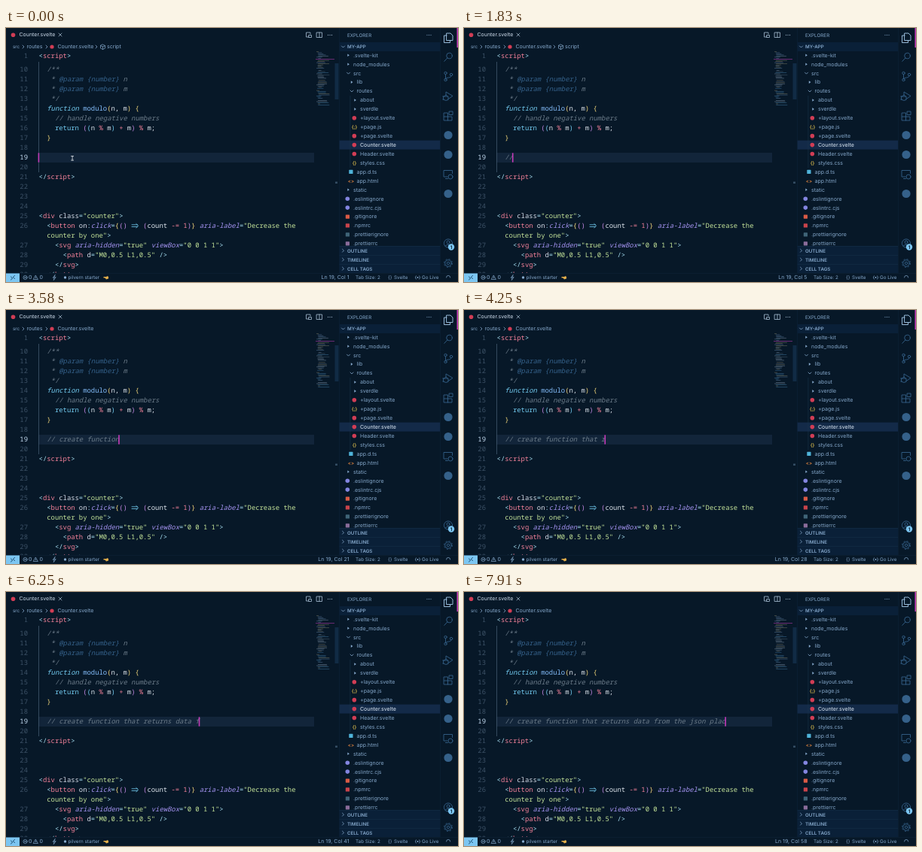
Recreate the animation shown at these times as an HTML page. Size 600 by 338 pixels, loop 8000 ms.

```html
<!DOCTYPE html>
<html lang="en">
<head>
<meta charset="utf-8">
<title>Code editor</title>
<style>
  html, body { margin: 0; width: 100%; height: 100%; overflow: hidden; background: #071828; }
  svg { display: block; width: 100%; height: 100%; }
  text { white-space: pre; text-rendering: geometricPrecision; }
  .code { font: 500 8.88px "Noto Sans Mono", "DejaVu Sans Mono", monospace; fill: #dfe6ee; font-variant-ligatures: none; }
  .ui { font: 7px Inter, Roboto, sans-serif; fill: #86a9cc; }
  .small { font-size: 6.3px; }
  .bold { font-weight: 600; font-size: 6.2px; }
  .line { fill: none; stroke: #35618a; stroke-width: .9; stroke-linecap: round; stroke-linejoin: round; }
  .num { fill: #3d5267; font-weight: 400; }
  .current { fill: #c5dcf2; }
  .comment { fill: #6c7c8a; font-style: italic; font-weight: 400; }
  .ghost { fill: #5a6978; font-style: italic; font-weight: 400; }
  .punct { fill: #a5dcef; }
  .tag { fill: #f5829a; }
  .attr { fill: #a594f2; font-style: italic; }
  .plain { fill: #d9deea; }
  .string { fill: #c5e49a; }
  .key { fill: #74cdf2; }
  .storage { fill: #74cdf2; font-style: italic; }
  .fn { fill: #84bdfa; }
  .op { fill: #f5829a; }
  .brace { fill: #f2d67a; }
  .round { fill: #c78ae6; }
  .doc { fill: #35618a; font-style: italic; }
</style>
</head>
<body>
<svg id="stage" viewBox="0 0 600 338"></svg>
<script>
const CELL = 5.328, LEFT = 43.6, LOOP = 8000;
const BACK = '#071828', RED = '#d13d55', PINK = '#c43bb8', DIM = '#35618a', TEXT = '#86a9cc', SKY = '#7cc6f2';
const out = [];
const add = markup => out.push(markup);
const esc = s => s.replace(/&/g, '&amp;').replace(/</g, '&lt;');
const rect = (x, y, w, h, fill, extra = '') =>
  add(`<rect x="${x}" y="${y}" width="${w}" height="${h}" fill="${fill}" ${extra}/>`);
const dot = (x, y, r, fill) => add(`<circle cx="${x}" cy="${y}" r="${r}" fill="${fill}"/>`);
const ring = (x, y, r, extra = '') => add(`<circle class="line" cx="${x}" cy="${y}" r="${r}" ${extra}/>`);
const line = (d, extra = '') => add(`<path class="line" d="${d}" ${extra}/>`);
const pen = (color, width) => `style="stroke:${color};stroke-width:${width}"`;
const ui = (x, y, s, cls = '', extra = '') =>
  add(`<text class="ui ${cls}" x="${x}" y="${y + 2.4}" ${extra}>${esc(s)}</text>`);
const chevron = (x, y, open) => line(open
  ? `M${x - 2} ${y - 1}l2 2 2-2` : `M${x - 1} ${y - 2}l2 2-2 2`, pen(TEXT, .8));
const triangle = (x, y) => add(`<path d="M${x - 1.2} ${y - 1.8}l2.6 1.8-2.6 1.8z" fill="${TEXT}"/>`);

// Each segment is "class|text"; an empty class keeps the default colour.
function code(number, y, indent, ...segments) {
  if (number) add(`<text class="code num ${number === 19 ? 'current' : ''}" x="29" y="${y + 3.1}" text-anchor="end">${number}</text>`);
  const spans = segments.map(s => {
    const cut = s.indexOf('|');
    return `<tspan class="${s.slice(0, cut)}">${esc(s.slice(cut + 1))}</tspan>`;
  });
  if (spans.length)
    add(`<text class="code" x="${LEFT + indent * CELL}" y="${y + 3.1}">${spans.join('')}</text>`);
}

function drawEditor() {
  dot(9.5, 9.3, 2.8, RED);
  ui(17.5, 9, 'Counter.svelte', '', 'style="fill:#cfdcec"');
  line('M70 7l4 4m0-4l-4 4', pen('#9fb6c8', .8));
  const bright = pen('#a9bfd4', .8);
  line('M402 12h-3.5V6H404v2M402 9.5h3.5v3H402z', bright);
  line('M412.5 6h7v6.5h-7zM416 6v6.5', bright);
  [427.5, 430, 432.5].forEach(x => dot(x, 9.3, .65, '#a9bfd4'));

  ui(9, 25, 'src', 'small');
  chevron(23, 25);
  ui(27.5, 25, 'routes');
  chevron(54, 25);
  dot(61, 25, 2.6, RED);
  ui(68.5, 25, 'Counter.svelte');
  add('<g id="crumb">');
  chevron(120, 25);
  line('M128.5 22l3 1.5v3.5l-3 1.5-3-1.5v-3.5zM125.5 23.5l3 1.5 3-1.5M128.5 25v3.5', pen(TEXT, .7));
  ui(134, 25, 'script');
  add('</g>');

  rect(43, 166, 366, 13, '#12253a');
  rect(43.2, 45, .7, 147, '#4a6076');
  code(1, 36.5, 0, 'punct|<', 'tag|script', 'punct|>');
  code(10, 55, 2, 'comment|/**');
  code(11, 68, 2, 'comment| * ', 'doc|@param {number}', 'comment| n');
  code(12, 81, 2, 'comment| * ', 'doc|@param {number}', 'comment| m');
  code(13, 94, 2, 'comment| */');
  code(14, 107, 2, 'storage|function ', 'fn|modulo', 'brace|(', '|n, m', 'brace|) {');
  code(15, 120, 4, 'comment|// handle negative numbers');
  code(16, 133, 4, 'key|return ', 'round|(', 'key|(', '|n ', 'op|% ', '|m', 'key|) ', 'op|+ ', '|m', 'round|) ', 'op|% ', '|m;');
  code(17, 146, 2, 'brace|}');
  [18, 19, 20].forEach(n => code(n, 172 + (n - 19) * 13, 0));
  code(21, 198, 0, 'punct|</', 'tag|script', 'punct|>');
  [22, 23, 24].forEach(n => code(n, 198 + (n - 21) * 13, 0));
  code(25, 250, 0, 'punct|<', 'tag|div ', 'plain|class', 'punct|=', 'string|"counter"', 'punct|>');
  code(26, 263, 2, 'punct|<', 'tag|button ', 'plain|on', 'punct|:', 'attr|click', 'punct|=', 'brace|{',
    'round|()', '|    ', 'round|(', '|count ', 'op|-= ', 'op|1', 'round|)', 'brace|} ',
    'attr|aria-label', 'punct|=', 'string|"Decrease the');
  line('M167 261.8h7.5m-7.5 2.7h7.5m-1.7-4l2.8 2.7-2.8 2.7', pen('#74cdf2', .8));
  code(0, 276, 2, 'string|counter by one"', 'punct|>');
  code(27, 289, 4, 'punct|<', 'tag|svg ', 'attr|aria-hidden', 'punct|=', 'string|"true" ',
    'attr|viewBox', 'punct|=', 'string|"0 0 1 1"', 'punct|>');
  code(28, 302, 6, 'punct|<', 'tag|path ', 'plain|d', 'punct|=', 'string|"M0,0.5 L1,0.5" ', 'punct|/>');
  code(29, 315, 4, 'punct|</', 'tag|svg', 'punct|>');
  code(30, 328, 2, 'punct|</', 'tag|button', 'punct|>');

  add(`<text id="typed" class="code" x="${LEFT + 2 * CELL}" y="175.1"></text>`);
  rect(0, 166.3, 1.6, 12.4, PINK, 'id="caret"');
  line('M86.6 170.5h3M88.1 170.5v5.5M86.6 176h3', 'id="pointer" ' + pen('#e4e8ec', .8));
}

function drawMinimap() {
  let seed = 7;
  const random = () => (seed = seed * 16807 % 2147483647) / 2147483647;
  const tones = ['#4f8fc0', '#8fa3b8', '#5d7082', '#6f8fb8', '#9a8f70'];
  for (let i = 0; i < 49; i++) {
    if (i % 9 === 7) continue;
    const x = 412 + (i % 5 ? 1 + random() * 2 : 0);
    rect(x, 31 + i * 1.48, 3 + random() * 13, .75, tones[Math.floor(random() * 5)], 'opacity=".5"');
  }
  rect(411, 41, 25, .8, PINK, 'opacity=".65"');
  rect(436.5, 47, 5, 48, '#1d4468', 'opacity=".45"');
  rect(437, 204.5, 3, 2.5, '#52718b', 'opacity=".6"');
}

function drawExplorer() {
  rect(442, 0, .6, 326, '#0e2438');
  ui(453, 9.5, 'EXPLORER', 'small');
  [559, 561.5, 564].forEach(x => dot(x, 9.3, .6, TEXT));
  rect(442.6, 19, 133.4, 12, '#0a2038');
  chevron(447.5, 25, true);
  ui(453, 25, 'MY-APP', 'bold');

  const purple = '#8385e0', orange = '#e0853f', gold = '#e0c04d';
  // kind: ">" closed folder, "v" open folder, "{…" or "<…" text icon, otherwise an icon colour
  const rows = [
    ['.svelte-kit', 0, '>'], ['node_modules', 0, '>'], ['src', 0, 'v'], ['lib', 1, '>'], ['routes', 1, 'v'],
    ['about', 2, '>'], ['sverdle', 2, '>'], ['+layout.svelte', 2, RED], ['+page.js', 2, '{;}'],
    ['+page.svelte', 2, RED], ['Counter.svelte', 2, RED], ['Header.svelte', 2, RED], ['styles.css', 2, '{}'],
    ['app.d.ts', 1, '#4fb3d9'], ['app.html', 1, '<>'], ['static', 0, '>'], ['.eslintignore', 0, purple],
    ['.eslintrc.cjs', 0, purple], ['.gitignore', 0, '#d95a45'], ['.npmrc', 0, '#c8434b'],
    ['.prettierignore', 0, '#3f6478'], ['.prettierrc', 0, '#8a6c9a']
  ];
  rows.forEach(([name, depth, kind], i) => {
    const y = 36.3 + i * 11.93, x = 461 + depth * 4.5, active = name === 'Counter.svelte';
    if (active) rect(442.6, y - 6, 133.4, 12, '#132a48');
    if (kind === 'v') chevron(x - 6.5, y, true);
    else if (kind === '>') triangle(x - 6.5, y);
    else if (kind[0] === '{' || kind[0] === '<')
      ui(x - 7.5, y, kind, 'bold', `text-anchor="middle" style="fill:${kind[0] === '<' ? orange : gold}"`);
    else if (kind === RED || kind === purple) dot(x - 7.7, y, 2.8, kind);
    else rect(x - 10.2, y - 2.6, 5.2, 5.2, kind, 'rx=".6"');
    ui(x, y, name, '', active ? 'style="fill:#e3eefa"' : '');
  });
  rect(456.7, 90, .5, 96, '#1c3a50');

  ['OUTLINE', 'TIMELINE', 'CELL TAGS'].forEach((name, i) => {
    const y = 296.2 + i * 12;
    rect(442.6, y - 6, 133.4, 12, '#0a2038');
    rect(442.6, y - 6, 133.4, .6, '#15304a');
    chevron(447.5, y);
    ui(453, y, name, 'bold');
  });
}

function drawActivityBar() {
  rect(576, 0, 24, 326, BACK);
  rect(576, 0, .6, 326, '#0e2438');
  rect(598.5, 0, 1.5, 26, PINK);
  line('M585 7h5l3 3v6.5h-8zM585 10h-3.5v9.5h8V17', pen('#a9cdec', .9));
  ring(588.5, 37, 3.8);
  line('M585.8 40l-4 4.3');
  [[583.5, 60], [583.5, 69], [591, 62]].forEach(([x, y]) => ring(x, y, 1.7));
  line('M583.5 62v5M591 64c0 3-7 1-7.5 4');
  line('M584 89v-4l9 5.5-6 4');
  line('M581 91h6v4.5q-3 2-6 0zM579.8 91h1.2M579.8 95h1.2M582 91q2-4 4 0');
  line('M581.5 113h5v5h5.5v5h-10.5zM581.5 118h5v5M588.5 111h4.5v4.5h-4.5z');
  [142.5, 168.5, 220.5].forEach(y => dot(587, y, 5.6, DIM));
  line('M586 198h-5v-8.5h11.5v4M583.5 200.5h3');
  ring(590, 198, 3);
  ring(587, 286.5, 5.6);
  ring(587, 285, 2);
  line('M583 290.2q4-4 8 0');
  dot(591, 291.5, 4.2, SKY);
  ui(591, 291.3, '1', 'bold', `text-anchor="middle" style="fill:${BACK}"`);
  ring(587, 313, 1.7);
  ring(587, 313, 4.2);
  ring(587, 313, 5.4, 'stroke-dasharray="2.12" style="stroke-linecap:butt"');
}

function drawStatusBar() {
  rect(0, 326, 600, 12, BACK);
  rect(0, 326, 600, .5, '#0e2438');
  rect(0, 326.5, 18, 11.5, SKY);
  line('M6.5 331l2.2 2-2.2 2M11.5 329.5l-2.2 2 2.2 2', pen('#0c3a5c', .9));
  const thin = pen(TEXT, .7);
  ring(25.5, 332, 2.6, thin);
  line('M24.5 331l2 2m0-2l-2 2', thin);
  ui(30, 332, '0');
  line('M39.5 329.3l2.9 5.2h-5.8zM39.5 331.3v1.5', thin);
  ui(44.5, 332, '0');
  line('M65 328.7l-2.8 3.7h2l-1 3.2 3-4h-2z', thin);
  dot(78.5, 332, 1.7, TEXT);
  ui(82.5, 332, 'pilvern starter', 'small');
  add('<path d="M129.5 331h3.5l2-1q1.6 1 1 3.6l-3 1-1.6-2h-1.9z" fill="#e0ac4a"/>');
  add('<text id="position" class="ui" x="455.5" y="334.4" text-anchor="end"></text>');
  ui(464, 332, 'Tab Size: 2', 'small');
  ui(507, 332, '{}', 'small');
  ui(515, 332, 'Svelte', 'small');
  dot(546.5, 332, 1, TEXT);
  line('M544.3 334.2a3.1 3.1 0 0 1 0-4.4M548.7 329.8a3.1 3.1 0 0 1 0 4.4', thin);
  ui(552, 332, 'Go Live', 'small');
  line('M584.5 332q0-2.6 2.6-2.6t2.6 2.6', thin);
}

rect(0, 0, 600, 338, BACK);
drawEditor();
drawMinimap();
drawExplorer();
drawActivityBar();
drawStatusBar();
document.getElementById('stage').innerHTML = out.join('');

const [typed, caret, pointer, crumb, position] =
  ['typed', 'caret', 'pointer', 'crumb', 'position'].map(id => document.getElementById(id));

const INDENT_AT = 500, GHOST_AT = 830, TYPE_AT = 1660, CRUMB_END = 2900, REWRITE_AT = 5450;
const GHOST = '$: $displayed_count = Math.round($displayed_count);';
const FIRST = '// create function that requires ';
const SECOND = '// create function that returns data from the json plac';
// [time, characters on the line]
const pace = [[TYPE_AT, 0], [2410, 8], [3580, 18], [4920, 33], [5060, 33], [REWRITE_AT, 26], [6250, 38], [7910, 55]];

function charsAt(t) {
  if (t <= TYPE_AT) return 0;
  const i = pace.findIndex(([time]) => time >= t);
  if (i < 0) return SECOND.length;
  const [t0, n0] = pace[i - 1], [t1, n1] = pace[i];
  return Math.floor(n0 + (n1 - n0) * (t - t0) / (t1 - t0) + .3);
}

const show = (node, on) => node.setAttribute('visibility', on ? 'visible' : 'hidden');

function frame() {
  const t = performance.now() % LOOP;
  const count = charsAt(t);
  const ghost = t >= GHOST_AT && t < TYPE_AT;
  const column = t < INDENT_AT ? 0 : 2 + count;
  typed.textContent = ghost ? GHOST : (t < REWRITE_AT ? FIRST : SECOND).slice(0, count);
  typed.setAttribute('class', `code ${ghost ? 'ghost' : 'comment'}`);
  caret.setAttribute('x', LEFT - 1 + column * CELL);
  show(caret, t < 1000 || t >= 1500);
  show(pointer, t < INDENT_AT);
  show(crumb, t < CRUMB_END);
  position.textContent = `Ln 19, Col ${column + 1}`;
  requestAnimationFrame(frame);
}
frame();
</script>
</body>
</html>
```
